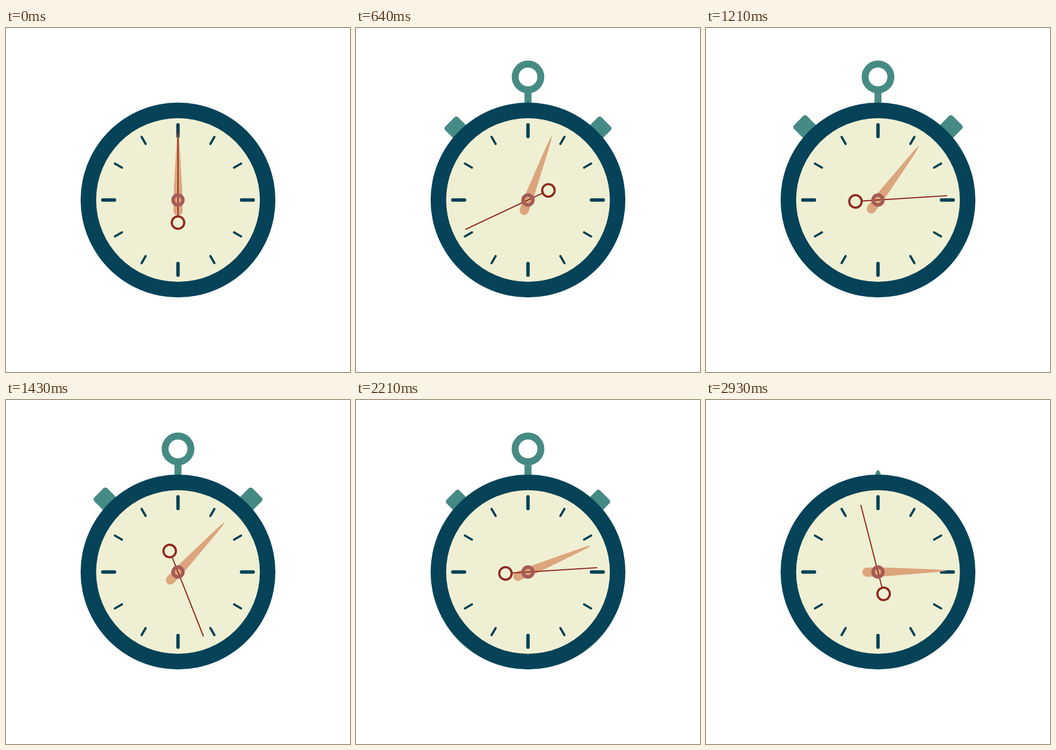
Recreate the animation shown at these times as an HTML page with a canvas. Size 640 by 640 pixels, loop 3000 ms.

```html
<!DOCTYPE html>
<html lang="en">
<head>
<meta charset="utf-8">
<title>Stopwatch</title>
<style>
  html, body { margin: 0; width: 100%; height: 100%; overflow: hidden; background: #fff; }
  canvas { display: block; width: 640px; height: 640px; }
</style>
</head>
<body>
<canvas id="stage"></canvas>
<script>
const SIZE = 640, LOOP = 3000, FPS = 14, BASE_FPS = 25;
const NAVY = '#064358', CREAM = '#eff0d3', TEAL = '#458b84';
const ORANGE = '#dca57d', RED = '#8f291f', HUB = '#a65b55';

const canvas = document.getElementById('stage');
const ctx = canvas.getContext('2d');
const dpr = window.devicePixelRatio || 1;
canvas.width = canvas.height = SIZE * dpr;

const rad = deg => deg * Math.PI / 180;
const easeOut = u => 1 - (1 - u) ** 2;
const easeIn = u => u * u;
const easeInOut = u => u < 0.5 ? 2 * u * u : 1 - 2 * (1 - u) ** 2;

// Keys are [seconds, value, easing into this key].
function track(keys, t) {
  for (let i = 1; i < keys.length; i++) {
    const [t0, a] = keys[i - 1];
    const [t1, b, ease] = keys[i];
    if (t < t1) return a + (b - a) * ease((t - t0) / (t1 - t0));
  }
  return keys[keys.length - 1][1];
}

const CROWN_DROP = [[0, 84], [0.58, 0, easeOut], [2.54, 0, easeOut], [3, 84, easeIn]];
const CROWN_WIDTH = [[0, 0.25], [0.38, 0.25, easeOut], [0.7, 1, easeInOut],
  [2.32, 1, easeOut], [2.62, 0.25, easeInOut]];
const BUTTON_REACH = [[0, 170], [0.42, 204.6, easeOut], [1.2, 208.9, easeInOut],
  [2.2, 202, easeInOut], [2.46, 205.2, easeInOut], [2.84, 170, easeIn]];

// The picture moves in 14 steps a second, each landing on a 25 fps tick.
function stepTime(ms) {
  let n = 0;
  while (Math.round((n + 1) * 100 / FPS) * 10 <= ms) n++;
  return Math.ceil(n * BASE_FPS / FPS) / BASE_FPS;
}

function turned(deg, draw) {
  ctx.save();
  ctx.rotate(rad(deg));
  draw();
  ctx.restore();
}

function disc(r, color) {
  ctx.fillStyle = color;
  ctx.beginPath();
  ctx.arc(0, 0, r, 0, Math.PI * 2);
  ctx.fill();
}

function ring(y, r, width, color) {
  ctx.strokeStyle = color;
  ctx.lineWidth = width;
  ctx.beginPath();
  ctx.arc(0, y, r, 0, Math.PI * 2);
  ctx.stroke();
}

function line(y0, y1, width, color) {
  ctx.strokeStyle = color;
  ctx.lineWidth = width;
  ctx.lineCap = 'round';
  ctx.beginPath();
  ctx.moveTo(0, y0);
  ctx.lineTo(0, y1);
  ctx.stroke();
}

function crown(t) {
  const y = -229 + track(CROWN_DROP, t);
  const sx = track(CROWN_WIDTH, t);
  ctx.fillStyle = TEAL;
  ctx.fillRect(-6.5, y + 27, 13, 30);
  ctx.beginPath();
  ctx.ellipse(0, y, 30.5 * sx, 30.5, 0, 0, Math.PI * 2);
  ctx.ellipse(0, y, 17.6 * sx, 17.6, 0, 0, Math.PI * 2);
  ctx.fill('evenodd');
}

function button(reach) {
  ctx.fillStyle = TEAL;
  ctx.beginPath();
  ctx.roundRect(-17, -reach, 34, 60, 5);
  ctx.fill();
}

function dial() {
  disc(181.2, NAVY);
  disc(152.3, CREAM);
  for (let i = 0; i < 12; i++) {
    turned(i * 30, () => i % 3
      ? line(-135.5, -120.5, 4.2, NAVY)
      : line(-139.8, -118.2, 6.4, NAVY));
  }
}

function minuteHand() {
  ctx.fillStyle = ORANGE;
  ctx.beginPath();
  ctx.moveTo(-8.6, 20.5);
  ctx.lineTo(-7.8, -18);
  ctx.lineTo(-2.6, -108);
  ctx.quadraticCurveTo(-1.6, -123, 0, -127);
  ctx.quadraticCurveTo(1.6, -123, 2.6, -108);
  ctx.lineTo(7.8, -18);
  ctx.lineTo(8.6, 20.5);
  ctx.arc(0, 20.5, 8.6, 0, Math.PI);
  ctx.fill();
}

function secondHand() {
  line(-128, 30, 2.1, RED);
  ring(42, 11.6, 4, RED);
}

function draw(t) {
  ctx.setTransform(dpr, 0, 0, dpr, 0, 0);
  ctx.fillStyle = '#fff';
  ctx.fillRect(0, 0, SIZE, SIZE);
  ctx.translate(SIZE / 2, SIZE / 2);
  crown(t);
  const reach = track(BUTTON_REACH, t);
  turned(-45, () => button(reach));
  turned(45, () => button(reach));
  dial();
  turned(t * 30, minuteHand);
  turned(t * 360, secondHand);
  ring(0, 9.2, 6.4, HUB);
}

function tick() {
  draw(stepTime(performance.now() % LOOP));
  requestAnimationFrame(tick);
}
tick();
</script>
</body>
</html>
```
